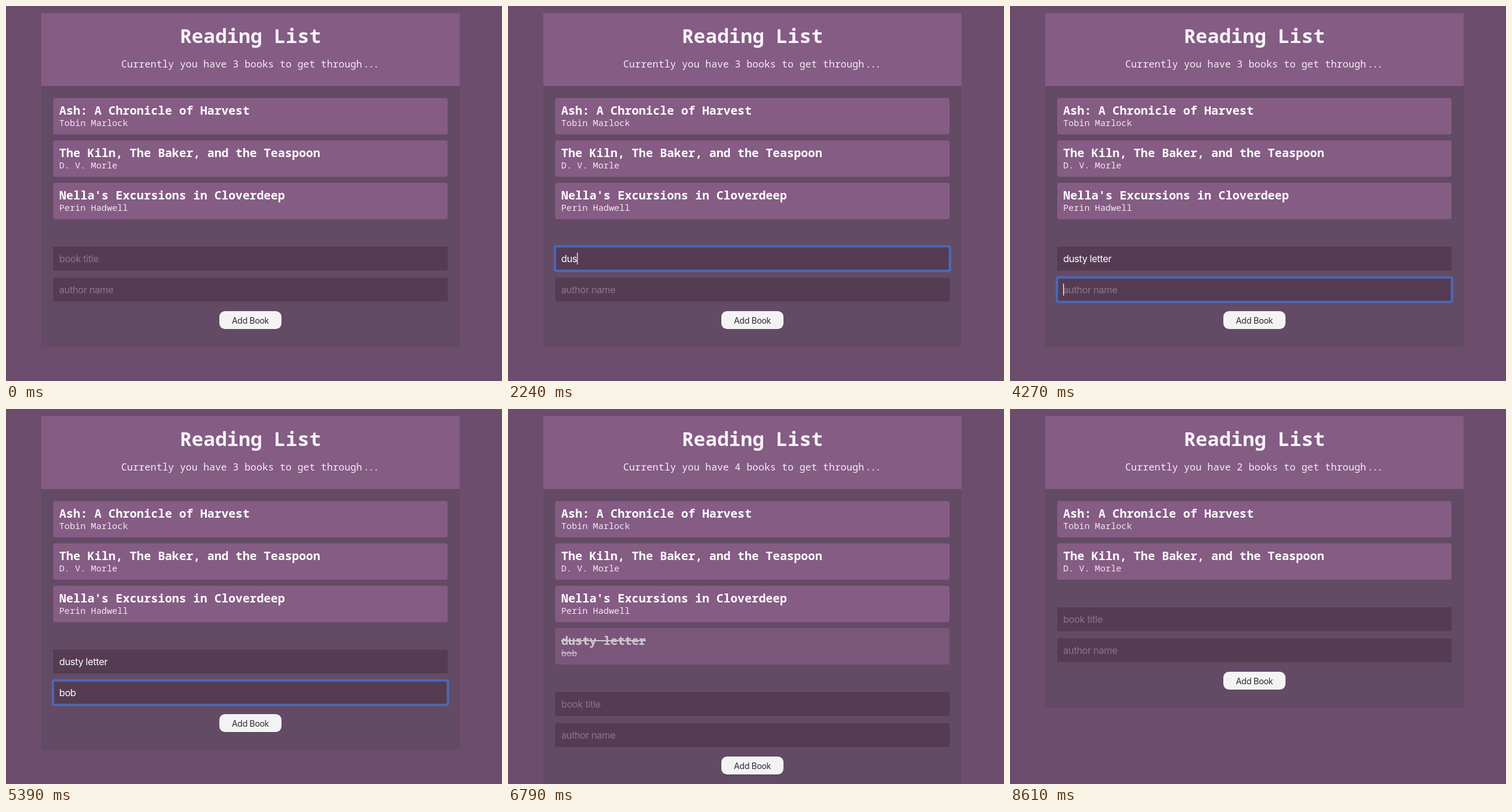
Recreate the animation shown at these times as an HTML page. Size 830 by 628 pixels, loop 8680 ms.

```html
<!DOCTYPE html>
<html lang="en">
<head>
<meta charset="utf-8">
<title>Reading List</title>
<style>
  html, body { margin: 0; width: 100%; height: 100%; overflow: hidden; background: #6d4d6d; }
  svg { display: block; width: 830px; height: 628px; }
  text { font-family: "Noto Sans Mono", "DejaVu Sans Mono", monospace; fill: #fff; white-space: pre; }
  .heading { font-size: 32.8px; font-weight: 700; fill: #f8f2f8; text-anchor: middle; }
  .summary { font-size: 16.4px; font-weight: 300; fill: #f6eef6; }
  .title { font-size: 19.68px; font-weight: 700; }
  .author { font-size: 14.76px; font-weight: 300; fill: #f1e8f1; }
  .hover { opacity: .7; }
  .hover text { text-decoration: line-through; }
  .field text { font-family: Inter, "Liberation Sans", sans-serif; font-size: 16px; letter-spacing: -.4px; }
  .field .empty { fill: #8d738d; }
  .button text { font-family: Inter, "Liberation Sans", sans-serif; font-size: 14px; letter-spacing: -.3px; fill: #2b2930; text-anchor: middle; }
</style>
</head>
<body>
<svg viewBox="0 0 830 628" id="stage"></svg>
<script>
const LOOP = 8680;
const ROW = 71;
const NEW_TITLE = "dusty letter";
const NEW_AUTHOR = "bob";

const BOOKS = [
  ["Ash: A Chronicle of Harvest", "Tobin Marlock"],
  ["The Kiln, The Baker, and the Teaspoon", "D. V. Morle"],
  ["Nella's Excursions in Cloverdeep", "Perin Hadwell"],
  [NEW_TITLE, NEW_AUTHOR]
];

const TIMES = {
  focusTitle: 1050, focusAuthor: 4060, add: 5950,
  hoverNew: 6510, removeNew: 7070, hoverThird: 7350, removeThird: 7910
};
const TYPING = {
  title: { start: 1960, step: 135, text: NEW_TITLE },
  author: { start: 4550, step: 140, text: NEW_AUTHOR }
};

const stage = document.getElementById("stage");

function make(parent, tag, attrs, content) {
  const node = document.createElementNS("http://www.w3.org/2000/svg", tag);
  set(node, attrs);
  if (content) node.textContent = content;
  return parent.appendChild(node);
}

function set(node, attrs) {
  for (const key in attrs) node.setAttribute(key, attrs[key]);
}

const show = (node, visible) => set(node, { visibility: visible ? "visible" : "hidden" });
const between = (t, from, to) => t >= from && t < to;

// Static page
make(stage, "rect", { width: 830, height: 628, fill: "#6d4d6d" });
const panel = make(stage, "rect", { x: 59, y: 12, width: 700, fill: "#634a65" });
make(stage, "rect", { x: 59, y: 12, width: 700, height: 122, fill: "#845c84" });
make(stage, "text", { x: 409, y: 62, class: "heading" }, "Reading List");

const summary = make(stage, "text", { x: 192.7, y: 103, class: "summary" });
const summaryText = make(summary, "tspan", {});
make(summary, "tspan", { dx: "2 -1.6 -1.6" }, "...");

const cards = BOOKS.map(([title, author], i) => {
  const card = make(stage, "g", { transform: `translate(79 ${154 + i * ROW})` });
  make(card, "rect", { width: 660, height: 61, rx: 4, fill: "#855c84" });
  make(card, "text", { x: 10, y: 28, class: "title" }, title);
  make(card, "text", { x: 10, y: 47, class: "author" }, author);
  return card;
});

const form = make(stage, "g", {});

function makeField(y, placeholder) {
  const group = make(form, "g", { class: "field", transform: `translate(79 ${y})` });
  make(group, "rect", { width: 660, height: 40, fill: "#553c53" });
  const ring = make(group, "g", { fill: "none", stroke: "#4a6dbd" });
  const outline = { x: -.5, y: -.5, width: 661, height: 41, rx: 2 };
  make(ring, "rect", { ...outline, "stroke-width": 5, "stroke-opacity": .4 });
  make(ring, "rect", { ...outline, "stroke-width": 2.6 });
  const label = make(group, "text", { x: 10, y: 26 });
  const caret = make(group, "rect", { y: 10, width: 1.2, height: 20, fill: "#fff" });
  return { ring, label, caret, placeholder };
}

const titleField = makeField(0, "book title");
const authorField = makeField(52, "author name");

const button = make(form, "g", { class: "button" });
make(button, "rect", { x: 357, y: 109, width: 104, height: 30, rx: 9.5, fill: "#000", opacity: .12 });
make(button, "rect", { x: 357, y: 108, width: 104, height: 30, rx: 9.5, fill: "#f4f3f4" });
make(button, "text", { x: 409, y: 129 }, "Add Book");

function typedText({ start, step, text }, t) {
  if (t >= TIMES.add) return "";
  const count = Math.floor((t - start) / step) + 1;
  return text.slice(0, Math.max(0, count));
}

// The caret stays solid while typing and blinks once per second when idle.
function caretOn({ start, step, text }, focusTime, t) {
  const lastKey = start + step * (text.length - 1);
  if (between(t, start, lastKey)) return true;
  const since = t < start ? focusTime : lastKey;
  return (t - since) % 1000 < 500;
}

function drawField(field, typing, from, to, t) {
  const value = typedText(typing, t);
  const focused = between(t, from, to);
  field.label.textContent = value || field.placeholder;
  set(field.label, { class: value ? "" : "empty" });
  show(field.ring, focused);
  show(field.caret, focused && caretOn(typing, from, t));
  set(field.caret, { x: value ? 10 + field.label.getComputedTextLength() : 10 });
}

function render(t) {
  const count = between(t, TIMES.add, TIMES.removeNew) ? 4 : t >= TIMES.removeThird ? 2 : 3;
  const offset = (count - 3) * ROW;

  set(panel, { height: 559 + offset });
  set(form, { transform: `translate(0 ${403 + offset})` });
  for (const field of [titleField, authorField]) {
    const isTitle = field === titleField;
    drawField(field, isTitle ? TYPING.title : TYPING.author,
      isTitle ? TIMES.focusTitle : TIMES.focusAuthor,
      isTitle ? TIMES.focusAuthor : TIMES.add, t);
  }
  set(form.children[0], { transform: "translate(79 0)" });

  summaryText.textContent = `Currently you have ${count} books to get through`;
  cards.forEach((card, i) => show(card, i < count));
  set(cards[2], { class: between(t, TIMES.hoverThird, TIMES.removeThird) ? "hover" : "" });
  set(cards[3], { class: between(t, TIMES.hoverNew, TIMES.removeNew) ? "hover" : "" });
}

const startTime = performance.now();

function tick() {
  render((performance.now() - startTime) % LOOP);
  requestAnimationFrame(tick);
}

tick();
</script>
</body>
</html>
```
